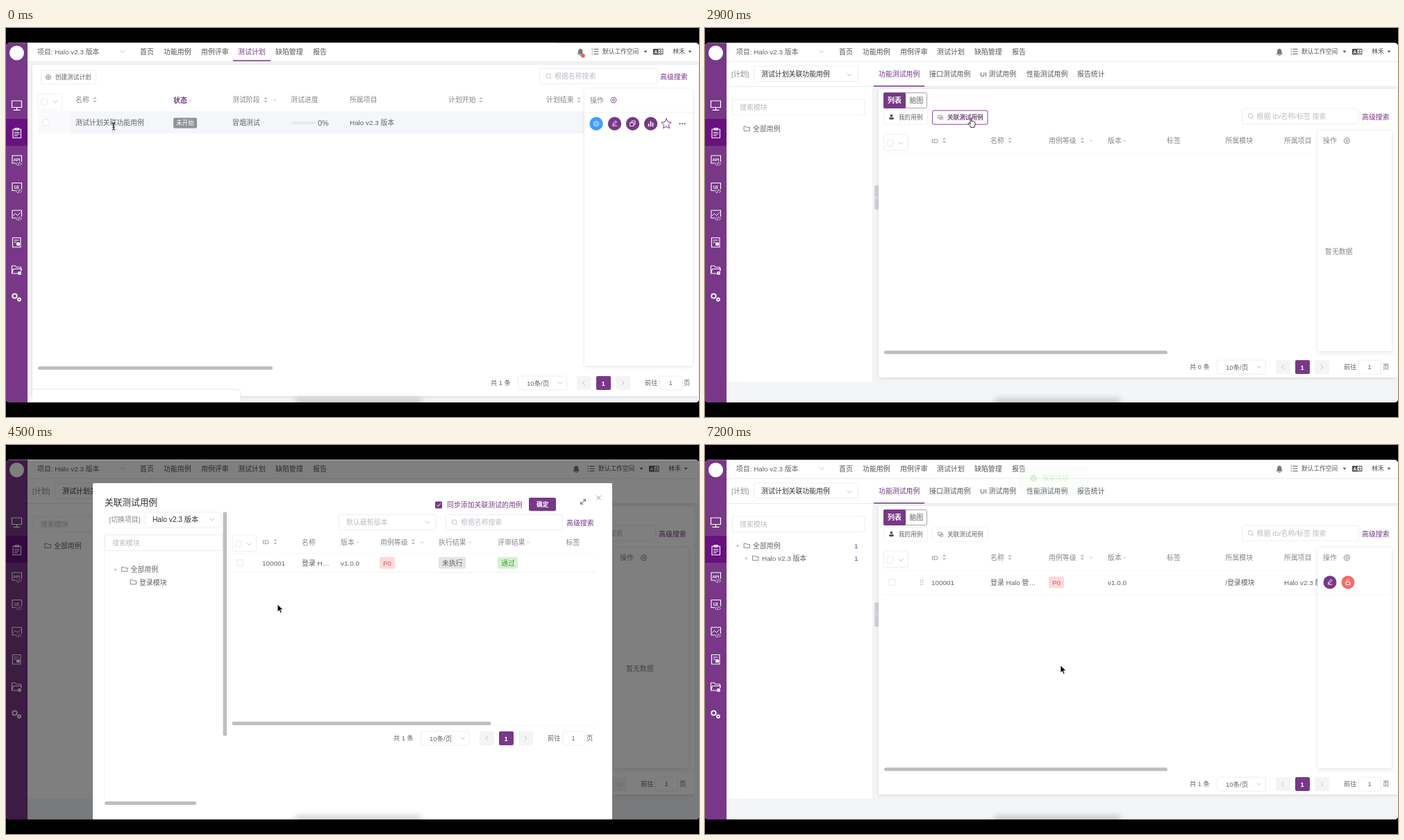
Animation of 998x561 px, one loop 7.4 s. Source, as an HTML page:

```html
<!DOCTYPE html>
<html lang="zh-CN">
<head>
<meta charset="utf-8">
<style>
html, body { margin: 0; width: 100%; height: 100%; overflow: hidden; background: #000; }
svg { display: block; width: 998px; height: 561px; }
text { font-family: "Liberation Sans", "Noto Sans CJK SC", "Noto Sans CJK", sans-serif; white-space: pre; }
.m { font-weight: 500; }
.b { font-weight: 700; }
</style>
</head>
<body>
<svg id="stage" viewBox="0 0 998 561"></svg>
<script>
const P = '#783887', INK = '#606266', HEAD = '#85878d', PALE = '#b9bcc4', DARK = '#303133', BG = '#f4f5f7', LINE = '#ebedf1';

// Text is placed by its left edge and its vertical middle
const t = (x, y, s, fill = INK, size = 9.9, cls = '') =>
  `<text x="${x}" y="${y + size * .37}" font-size="${size}" fill="${fill}" class="${cls}">${s}</text>`;
const r = (x, y, w, h, fill = '#fff', rx = 0, more = '') =>
  `<rect x="${x}" y="${y}" width="${w}" height="${h}" rx="${rx}" fill="${fill}" ${more}/>`;
const box = (x, y, w, h, stroke = '#e8eaee', rx = 2) =>
  r(x, y, w, h, '#fff', rx, `stroke="${stroke}" stroke-width=".8"`);
const p = (d, stroke = HEAD, w = .9, fill = 'none') =>
  `<path d="${d}" fill="${fill}" stroke="${stroke}" stroke-width="${w}" stroke-linecap="round" stroke-linejoin="round"/>`;
const c = (x, y, rad, fill, more = '') => `<circle cx="${x}" cy="${y}" r="${rad}" fill="${fill}" ${more}/>`;
const g = (id, ...kids) => `<g id="${id}">${kids.join('')}</g>`;
const at = (x, y, s) => `<g transform="translate(${x} ${y})">${s}</g>`;

const chev = (x, y, w = 3, col = PALE) => p(`M${x - w} ${y - w / 2}l${w} ${w}l${w} ${-w}`, col);
const sort = (x, y) => p(`M${x - 2.7} ${y - 1.2}h5.4l-2.7 -2.9z M${x - 2.7} ${y + 1.2}h5.4l-2.7 2.9z`, 'none', 0, '#b6b9c1');
const caret = (x, y, col = '#555') => p(`M${x - 2.4} ${y - 1.3}h4.8l-2.4 3z`, 'none', 0, col);
const check = (x, y) => box(x - 4.5, y - 4.5, 9, 9, '#dfe2e8', 1.5);
const checked = (x, y) => r(x - 5, y - 5, 10, 10, P, 1.5) + p(`M${x - 2.4} ${y}l1.9 2l3.1 -4`, '#fff', 1);
const lens = (x, y) => c(x, y, 3.3, 'none', `stroke="${PALE}" stroke-width=".9"`) + p(`M${x + 2.4} ${y + 2.4}l1.8 1.8`, PALE);
const folder = (x, y) => p(`M${x - 4} ${y - 3}h2.8l1.2 1.3h4v5h-8z`, '#777a80');
const gear = (x, y, col) => p(`M${x - 4.2} ${y}l2.1 -3.7h4.2l2.1 3.7l-2.1 3.7h-4.2z`, col) + c(x, y, 1.5, 'none', `stroke="${col}" stroke-width=".9"`);
const bar = (x, y, w, h, col = '#bebebe') => r(x, y, w, h, col, 2.5);
const tag = (x, y, w, s, bg, col) => r(x, y - 8.5, w, 17, bg, 2) + t(x + 5, y, s, col);
const pencil = (x, y) => p(`M${x - 2.5} ${y + 2}l.5 -2l3.4 -3.6l1.6 1.5l-3.5 3.6z M${x - 3} ${y + 3.6}h6`, '#fff', .9);
const heads = (y, list) => list.map(([x, s]) => t(x, y, s, HEAD, 9.9, 'm')).join('');

const pager = (n, dx, y) => at(dx, y, [
  t(698, 0, `共 ${n} 条`, INK, 9.2), box(737.5, -10, 70, 20), t(750, 0, '10条/页', INK, 9.5, 'm'), chev(798, 0, 2.6),
  r(822, -10, 21, 20, '#f4f4f5', 2), p('M833.5 -3l-3 3l3 3', PALE),
  r(850, -10, 21, 20, P, 2), t(857.6, 0, '1', '#fff', 9.5, 'b'),
  r(878, -10, 21, 20, '#f4f4f5', 2), p('M887 -3l3 3l-3 3', PALE),
  t(920, 0, '前往', INK, 9.2), box(941.5, -10, 32, 20), t(954.5, 0, '1', INK, 9.2), t(976, 0, '页', INK, 9.2)
].join(''));

const topBar = active => r(31, 21.5, 967, 27) + r(31, 48, 967, .8, '#e6e7ea') +
  t(45, 34.5, '项目: Halo v2.3 版本') + chev(168, 34) +
  ['首页', '功能用例', '用例评审', '测试计划', '缺陷管理', '报告'].map((s, i) =>
    t([193, 227, 281, 334, 388, 442][i], 34, s, active && i == 3 ? P : '#515358', 9.9, active && i == 3 ? 'm' : '')).join('') +
  (active ? r(327, 46.3, 54, 1.5, P) : '');

const topRight = dot =>
  p('M823.5 37.5c1.2 -1.3 .8 -3.4 1 -4.6c.5 -3.6 5 -3.6 5.4 0c.2 1.2 -.2 3.3 1 4.6z M826 39.3h2.6', '#6b6d72', .8, '#77797e') +
  (dot ? c(831, 40, 2.8, '#f0595c') : '') +
  p('M844 30.5h.6M847 30.5h6M844 34h.6M847 34h6M844 37.5h.6M847 37.5h6', '#55575c', 1.1) +
  t(859, 34, '默认工作空间', '#515358', 8.7) + caret(921, 34) +
  r(932, 30, 14.5, 8.5, '#4d4f54', 1) + t(933.5, 34.2, 'A', '#fff', 6.5, 'b') + r(939.5, 31, 6, 6.5) + t(940, 34.2, '文', '#444', 5, 'b') +
  t(960, 34, '林禾', '#515358', 9) + caret(985, 34);

const codeMark = (x, y) => r(x - 4.5, y - 3, 9, 6, P) + p(`M${x - 2} ${y - 2}l-2 2l2 2M${x + 2} ${y - 2}l2 2l-2 2M${x + .8} ${y - 2.4}l-1.6 4.8`, '#fff', .8);
const frame = y => p(`M9 ${y - 6}h13.5v11h-13.5z`, '#fff', 1.1);
const cog = (x, y, s) => c(x, y, s, 'none', 'stroke="#fff" stroke-width="1.8"');
const sideBar = r(0, 21.5, 31, 518.5, P) + c(15.5, 36, 10.5, '#fff') + r(0, 131, 31, 39, '#68127f') +
  p('M8.5 105h14v9.5h-14z M15.5 115v3M11 118.3h9', '#fff', 1.2) +
  p('M10 146h11.5v12.5h-11.5z M13 144.5h5.5v2.4h-5.5z M12.5 150.5h6.5M12.5 153h6.5M12.5 155.5h4', '#fff', 1.1) +
  frame(190) + t(10.4, 190, 'API', '#fff', 6, 'b') + codeMark(18.5, 196) +
  frame(229.5) + t(12, 229.5, 'UI', '#fff', 6.5, 'b') + codeMark(18.5, 235.5) +
  frame(269) + p('M10.5 270.5l3 -3l3 3l4 -4', '#fff', 1) + codeMark(18.5, 275) +
  p('M9.5 302.5h11.5v13.5h-11.5z M12 306h6M12 309h3', '#fff', 1.1) + c(17.5, 311.5, 2.6, '#fff') +
  p('M8.5 354v-11h5l1.5 2h6.5v2.5M8.5 354l2 -6.5h12l-1 3M8.5 354h8', '#fff', 1.1) + cog(19.5, 353.5, 1.6) +
  cog(12.5, 386.5, 3.2) + cog(19, 391.5, 2);

const fixedPanel = (x, y, h) => r(x, y, 989 - x, h, '#fff', 0, 'filter="url(#soft)"') + r(x, y, 989 - x, h);

const listPage = r(31, 21.5, 967, 518.5, BG) + topBar(true) + topRight(true) +
  r(38, 53, 959, 478, '#fff', 2, 'filter="url(#soft)"') +
  box(50.5, 61, 79, 20) + c(61, 71, 3.4, 'none', `stroke="${INK}" stroke-width=".8"`) + p('M59.6 71h2.8M61 69.6v2.8', INK, .8) +
  t(71, 71, '创建测试计划', INK, 8.6, 'm') +
  box(768.5, 58.5, 170, 22) + lens(781, 69) + t(790, 69.5, '根据名称搜索', PALE) + t(942, 70.5, '高级搜索', P, 9.9, 'm') +
  box(46, 95, 35, 23) + check(55, 106.5) + chev(71, 106.5) +
  heads(103.5, [[100, '名称'], [326, '测试阶段'], [410, '测试进度'], [495, '所属项目'], [637, '计划开始'], [778, '计划结束']]) +
  t(241, 104, '状态', P, 9.9, 'b') + chev(265, 104.5, 2) + chev(387, 104, 2) +
  [128, 374, 684, 825].map(x => sort(x, 103.5)).join('') +
  r(46, 121, 47, 31, '#fafafc') + r(93, 121, 740, 31, '#f5f6fa') + r(46, 120.5, 787, .7, LINE) + check(58, 136.5) +
  t(100, 136, '测试计划关联功能用例') + r(241, 129.5, 34, 15, '#909399', 2) + t(245, 137, '未开始', '#fff', 8.6, 'm') +
  t(326, 136, '冒烟测试') + r(411, 135, 35, 4, '#e6e9f0', 2) + t(449, 137, '0%', INK, 10.8) + t(495, 136, 'Halo v2.3 版本') +
  fixedPanel(833.5, 88, 399) + t(841, 104, '操作', HEAD, 9.9, 'm') + gear(875, 104, P) + r(833.5, 121, 156, .7, LINE) +
  c(850, 138, 9.7, '#409eff') + c(850, 138, 3.5, 'none', 'stroke="#fff" stroke-width=".8"') + p('M849 136.4v3.2l2.4 -1.6z', '#fff', .5) +
  [876.5, 902.5, 928.5].map(x => c(x, 138, 9.7, P)).join('') + pencil(876.5, 137.5) +
  p('M899 136.5h5v5h-5z M901 136v-2h5v5h-1.8', '#fff', .9) + p('M925.5 141.5v-3M928.5 141.5v-6.5M931.5 141.5v-4.5', '#fff', 1.5) +
  p('M951 130.8l2.2 4.7l5 .6l-3.7 3.5l1 5l-4.5 -2.5l-4.5 2.5l1 -5l-3.7 -3.5l5 -.6z', P, 1) +
  [970.5, 974, 977.5].map(x => c(x, 138, 1, '#444')).join('') +
  bar(46, 488, 338, 5) + pager(1, 0, 512) +
  p('M38 521h294q6 0 6 7v12h-300', '#e3e4e6', .9, '#fff');

const tabs = [[250, '功能测试用例'], [323, '接口测试用例'], [396, 'UI 测试用例'], [463, '性能测试用例'], [536, '报告统计']];
const detailPage = r(31, 21.5, 967, 518.5, BG) + topBar(false) +
  r(31, 49, 967, 35.5) + r(31, 84, 967, .8, '#e4e6ea') +
  t(38, 66.5, '[计划]', '#85878d') + box(70.5, 55, 150, 22) + t(81, 66.5, '测试计划关联功能用例', DARK) + chev(208, 67.5) +
  tabs.map(([x, s], i) => t(x, 66.5, s, i ? '#55575c' : P, 9.9, i ? '' : 'm')).join('') + r(243, 83, 73, 1.5, P) +
  r(31, 85, 211, 425) + r(241.5, 85, .8, 425, '#e6e7ea') +
  box(39, 103, 191, 22) + t(50, 114.5, '搜索模块', PALE) + folder(60.5, 145) + t(69, 145.5, '全部用例') +
  r(244, 227, 6, 35, '#cfd1d6', 2) + p('M248 242.5l-2 2l2 2', '#fff') +
  r(250, 88, 747, 416, '#fff', 2, 'filter="url(#soft)"') +
  box(257.5, 93.5, 62, 22, '#8d8d92') + r(257, 93, 32, 23, P, 2) + t(263, 104.5, '列表', '#fff', 9.9, 'b') + t(294.5, 104.5, '脑图', INK, 9.9, 'm') +
  box(257.5, 119, 63, 20, '#eeeff2') + c(268.5, 126.5, 1.9, '#55575c') + r(265, 129, 7, 3, '#55575c', 1.4) + t(279, 128.5, '我的用例', INK, 8.6, 'm') +
  box(327.5, 119, 80, 20, '#eeeff2') + p('M336 126h5v4h-5z M338.5 128.5h4v3.5h-4z', '#85878d', .8) + t(349, 128.5, '关联测试用例', INK, 8.6, 'm') +
  g('hover', r(327.5, 119, 79.5, 20, 'none', 2, `stroke="${P}" stroke-width=".9"`), t(349, 128.5, '关联测试用例', P, 8.6, 'm')) +
  box(257.5, 153, 35, 23.5) + check(266.5, 165.5) + chev(282, 166) +
  heads(162, [[326, 'ID'], [411, '名称'], [495, '用例等级'], [580, '版本'], [665, '标签'], [749.5, '所属模块'], [834, '所属项目']]) +
  [344.5, 439, 543.5].map(x => sort(x, 162)).join('') + chev(556, 162.5, 2) + chev(604, 162.5, 2) +
  r(258, 180.5, 625, .7, '#f3f4f6') + bar(258, 465.3, 408, 5) +
  g('rows',
    caret(47, 145.5, PALE), t(215, 145.5, '1', P), p('M58.5 161l3 2.4l-3 2.4z', 'none', 0, PALE), folder(73, 163), t(82, 163.5, 'Halo v2.3 版本'), t(215, 163.5, '1', P),
    check(269.5, 198), [0, 1, 2].map(i => c(310.5, 195 + i * 3, .8, '#999') + c(313.5, 195 + i * 3, .8, '#999')).join(''),
    t(326, 198, '100001'), t(411, 198, '登录 Halo 管…'), tag(495, 198, 22, 'P0', '#ffd9d9', '#e25555'),
    t(580, 198, 'v1.0.0'), t(749.5, 198, '/登录模块'), t(834, 198, 'Halo v2.3 版本'), r(258, 215.5, 625, .7, LINE)) +
  g('right',
    r(997, 85, 8, 425, BG), topRight(false), fixedPanel(882.5, 148, 318), r(882.5, 470, 114, .7, LINE),
    box(773.5, 116, 168, 22), lens(785.5, 126.5), t(794.5, 127, '根据 ID/名称/标签 搜索', PALE), t(946, 128, '高级搜索', P, 9.9, 'm'),
    t(890, 162.5, '操作', HEAD, 9.9, 'm'), gear(924.5, 162.5, '#777a80'),
    g('none', pager(0, 0, 489)),
    g('acts', pager(1, 0, 489), r(882.5, 215.5, 106, .7, LINE), c(900, 198, 9.5, P), pencil(900, 197.5), c(926, 198, 9.5, '#f56c6c'),
      p('M923.3 197.5h5.4v3.8h-5.4z M924.5 197v-1.6c0 -2 3 -2 3 0', '#fff', .9))) +
  g('noData', t(893, 322.5, '暂无数据', '#85878d'));

const dialog = r(125, 55, 748, 485, '#fff', 1.5) +
  t(142, 82.5, '关联测试用例', DARK, 12.7) + t(148.5, 107.5, '[切换项目]', '#85878d') +
  box(200.5, 97, 109, 21.5) + t(211, 107.5, 'Halo v2.3 版本', DARK, 10.2) + chev(297, 107.5) +
  r(141.5, 130, .7, 382, LINE) + box(142, 129.5, 170, 23) + t(153, 141, '搜索模块', PALE) +
  bar(312.5, 96.5, 5.5, 323) + bar(142, 514, 132, 5) +
  checked(623, 86.5) + t(635, 86.5, '同步添加关联测试的用例', P, 9.9, 'm') +
  r(753, 76, 39, 19, P, 2) + g('okHover', r(753, 76, 39, 19, '#9461a0', 2)) + t(764, 85.5, '确定', '#fff', 8.7, 'b') +
  p('M828 85l6.2 -6M831.5 78.8h2.8v2.8M827.7 82.2v2.9h2.9', '#55575c', 1) + p('M850.5 73l6 6M856.5 73l-6 6', '#85878d', .9) +
  box(633.5, 100.5, 168, 22) + lens(645.5, 111) + t(655, 111.5, '根据名称搜索', PALE) + t(807, 112.5, '高级搜索', P, 9.9, 'm') +
  box(326, 130, 34.5, 23.5) + check(334.5, 142.5) + chev(350, 143) + r(326, 156.5, 522, .7, '#f3f4f6') +
  t(369, 139.5, 'ID', HEAD, 9.9, 'm') + sort(388, 139.5) + t(426, 140, '名称', HEAD, 9.9, 'm') +
  g('blank',
    t(228, 190.5, '暂无数据', '#77797e'), t(645, 277, '暂无数据', '#909399'),
    heads(139.5, [[482, '用例等级'], [567, '执行结果'], [652, '评审结果'], [750.5, '标签'], [813, '更新时间']]), r(849, 130, 23, 20),
    sort(530, 139.5), [543, 611, 696].map(x => chev(x, 140, 2)).join(''), bar(325.5, 398.5, 404, 5), pager(0, -140, 422.5)) +
  g('filled',
    caret(157.5, 180, PALE), folder(171, 179), t(179.5, 179.5, '全部用例'), folder(183.5, 197.5), t(192, 198, '登录模块'),
    box(479.5, 100.5, 140, 22), t(490, 111.5, '默认最新版本', PALE), chev(607, 111.5),
    heads(140, [[482, '版本'], [539, '用例等级'], [623, '执行结果'], [708, '评审结果'], [806.5, '标签']]),
    sort(586.5, 139.5), [506, 599, 668, 752].map(x => chev(x, 140.5, 2)).join(''),
    check(337.5, 170), t(369, 170, '100001'), t(426, 170, '登录 H…'), t(482, 170, 'v1.0.0'),
    tag(538, 170, 22, 'P0', '#ffd9d9', '#e25555'), tag(623, 170, 39, '未执行', '#e3e5e6', INK), tag(708, 170, 29, '通过', '#d3f2cd', '#4a9a48'),
    r(326, 183, 522, .7, LINE), bar(325.5, 399, 373, 5), pager(1, -140, 423)) +
  g('picked', checked(334.5, 142.5), checked(337.5, 170), t(534, 86.5, '已选中 1 条数据', DARK)) +
  g('mask', r(322, 126, 528, 280)) + r(326, 404, 522, .7, '#f1f2f4') +
  g('spin', p('M595.5 272.2l2.4 -3', '#333', 1.2));

const cursor = g('cursor',
  g('beam', p('M-2 -5q2 0 2 1.5v7q0 1.5 -2 1.5M2 -5q-2 0 -2 1.5v7q0 1.5 2 1.5M-1.2 1h2.4', '#222', 1)),
  g('arrow', p('M0 0v10.6l2.5 -2.3l1.7 4l1.9 -.8l-1.7 -3.9h3.4z', '#fff', .8, '#000')),
  g('hand', p('M-1.2 .8c0 -1.6 2 -1.6 2 0v4c.4 -1 1.8 -.8 1.9 .2c.5 -.8 1.7 -.5 1.8 .4c.6 -.5 1.5 0 1.5 .9v3c0 1.8 -1.2 2.4 -1.2 4h-5c0 -1.6 -2.2 -3 -3.4 -5.2c-.6 -1.3 1 -1.8 1.7 -.9l.7 .9z', '#111', .9, '#fff')));

const toast = g('toast', r(452.5, 42, 99, 32, '#ebf8e5', 2.5, 'stroke="#daf0cf" stroke-width=".8"') +
  c(473, 58, 5, '#67c23a') + p('M470.6 58l1.8 1.9l3 -3.7', '#fff', 1) + t(486, 58, '保存成功', '#67c23a', 9.4));

document.getElementById('stage').innerHTML = `<defs>
  <clipPath id="win"><rect y="21.5" width="998" height="518.5" rx="5"/></clipPath>
  <filter id="soft" x="-10%" y="-10%" width="120%" height="120%"><feDropShadow dx="0" dy="1" stdDeviation="2.5" flood-opacity=".13"/></filter>
  <filter id="blur" x="-20%" y="-150%" width="140%" height="400%"><feGaussianBlur stdDeviation="4"/></filter></defs>
  <g clip-path="url(#win)">${r(0, 21, 998, 520, BG)}${detailPage}
  ${g('tip', r(65, 107, 49, 24.5, '#303133', 2.5), t(72, 119.5, '全部用例', '#fff', 8.7))}
  ${g('list', listPage)}${sideBar}${g('shade', r(0, 21, 998, 520, '#000'))}${g('dialog', g('settle', dialog))}${toast}
  ${r(415, 534, 185, 14, '#000', 7, 'opacity=".17" filter="url(#blur)"')}${cursor}</g>`;

// Each track holds its value until the next time, given in ms
const LOOP = 7400;
let css = '';
const track = (id, prop, steps) => {
  const body = Object.entries(steps).map(([ms, v]) => `${Math.max(0, (ms - 5) / LOOP * 100).toFixed(3)}%{${prop}:${v}}`).join('');
  css += `@keyframes ${id}-${prop}{${body}}`;
  (track.on[id] ||= []).push(`${id}-${prop} ${LOOP}ms step-end infinite`);
};
track.on = {};
const fade = (id, steps) => track(id, 'opacity', steps);
const move = (id, steps) => track(id, 'transform', Object.fromEntries(
  Object.entries(steps).map(([ms, [x, y]]) => [ms, `translate(${x}px,${y}px)`])));

// Samples an eased straight path every 100 ms
const glide = (from, [x0, y0], [x1, y1], n) => Object.fromEntries(Array.from({ length: n }, (_, i) => {
  const u = (i + 1) / n, e = u * u * (3 - 2 * u);
  return [from + i * 100, [x0 + (x1 - x0) * e, y0 + (y1 - y0) * e]];
}));

fade('list', { 0: 1, 300: 0 });
fade('tip', { 0: 0, 1300: .5, 1400: 1, 1900: .7, 2000: .33, 2100: 0 });
fade('hover', { 0: 0, 2700: 1, 6500: 0 });
fade('shade', { 0: 0, 3100: .22, 3200: .5, 6400: .3, 6500: 0 });
fade('dialog', { 0: 0, 3100: .4, 3200: 1, 6400: .5, 6500: 0 });
move('dialog', { 0: [0, -9], 3200: [0, 0], 6400: [0, -5] });
move('settle', { 0: [0, 0], 5100: [0, .5] });
move('right', { 0: [0, 0], 3100: [-6, 0], 6500: [0, 0] });
fade('blank', { 0: 1, 3300: 0 });
fade('filled', { 0: 0, 3300: 1 });
fade('picked', { 0: 0, 5100: 1 });
fade('mask', { 0: 0, 3200: .5, 3300: .3, 3400: 0, 6200: .5, 6300: .8 });
fade('spin', { 0: 0, 3200: 1, 3300: 0, 6200: 1, 6400: 0 });
fade('okHover', { 0: 0, 5800: 1 });
for (const id of ['rows', 'acts']) fade(id, { 0: 0, 6600: 1 });
for (const id of ['none', 'noData']) fade(id, { 0: 1, 6600: 0 });
fade('toast', { 0: 0, 6400: .5, 6500: 1, 7000: .5, 7200: .22 });
move('toast', { 0: [0, -20], 6500: [0, 0], 7000: [0, -8], 7200: [0, -10] });
fade('beam', { 0: 1, 300: 0 });
fade('hand', { 0: 0, 300: 1, 1800: 0, 2700: 1, 3100: 0, 4800: 1, 5200: 0, 5800: 1, 6400: 0 });
fade('arrow', { 0: 0, 1800: 1, 2700: 0, 3100: 1, 4800: 0, 5200: 1, 5800: 0, 6400: 1 });
move('cursor', {
  0: [155, 142],
  ...glide(400, [155, 142], [82, 144], 5),
  ...glide(1800, [82, 144], [360, 241], 3),
  ...glide(2300, [360, 241], [383, 130], 7),
  3800: [402, 190], 3900: [409, 235], 4500: [391, 230],
  ...glide(4600, [391, 230], [337, 168], 4),
  ...glide(5200, [337, 168], [638, 236], 3),
  ...glide(5600, [638, 236], [777, 95], 4),
  ...glide(6400, [777, 95], [512, 318], 5)
});
for (const id in track.on) css += `#${id}{animation:${track.on[id].join(',')}}`;
document.head.appendChild(document.createElement('style')).textContent = css;
</script>
</body>
</html>
```
